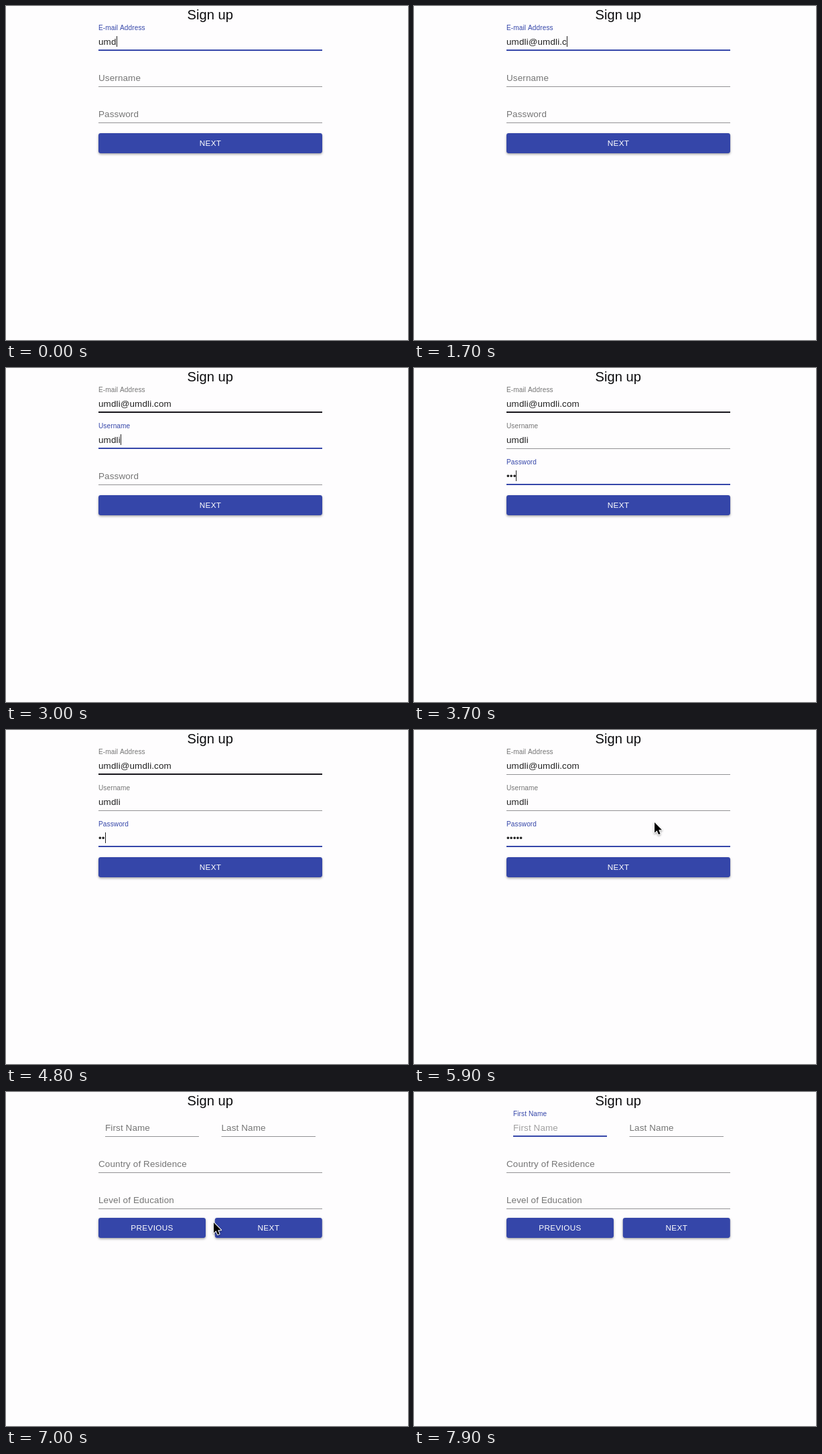
An HTML page with a canvas that plays this animation: 600x499 px, repeating every 8000 ms.

```html
<!DOCTYPE html>
<html lang="en">
<head>
<meta charset="utf-8">
<title>Sign up form</title>
<style>
  html, body { margin: 0; width: 100%; height: 100%; overflow: hidden; background: #fefdfe; }
  canvas { display: block; }
</style>
</head>
<body>
<canvas id="stage" width="600" height="499"></canvas>
<script>
const ctx = document.getElementById('stage').getContext('2d');
const LOOP = 8000, STEP = 100, SIZE = 13.44;
const PRIMARY = [53, 70, 169], DARK = [42, 54, 146], GREY = [117, 117, 117], INK = [33, 33, 33];
const RULE = [146, 146, 148], BLACK = [22, 20, 26];
const PRESS = 6583, SWITCH = 6750, TAB = 7150;

const rgb = c => `rgb(${c.map(Math.round)})`;
const mix = (a, b, p) => rgb(a.map((v, i) => v + (b[i] - v) * p));

// cubic-bezier(0, 0, .2, 1)
function ease(x) {
  if (x <= 0) return 0;
  if (x >= 1) return 1;
  let lo = 0, hi = 1;
  for (let i = 0; i < 24; i++) {
    const s = (lo + hi) / 2;
    if (.6 * (1 - s) * s * s + s ** 3 < x) lo = s; else hi = s;
  }
  return 3 * (1 - lo) * lo * lo + lo ** 3;
}

function text(str, x, y, size, color, align = 'left', spacing = .00938) {
  ctx.font = `${size}px "Liberation Sans", Arial, sans-serif`;
  ctx.letterSpacing = `${size * spacing}px`;
  ctx.textAlign = align;
  ctx.fillStyle = color;
  ctx.fillText(str, x, y);
  return ctx.measureText(str).width;
}

// keys: [time, number of characters typed]
const account = [
  { label: 'E-mail Address', y: 66, value: 'umdli@umdli.com', focus: -1000, blur: 2050, hoverEnd: 5800,
    keys: [[0, 3], [100, 4], [200, 5], [300, 8], [600, 5], [700, 6], [900, 7], [1100, 8], [1200, 9],
           [1300, 10], [1400, 11], [1600, 12], [1700, 13], [1900, 14], [2000, 15]] },
  { label: 'Username', y: 120, value: 'umdli', focus: 2050, blur: 3150,
    keys: [[2500, 1], [2600, 2], [2700, 3], [2800, 4], [3000, 5]] },
  { label: 'Password', y: 174, value: '•••••', focus: 3150, blur: PRESS,
    keys: [[3500, 1], [3700, 3], [4200, 2], [4300, 1], [4400, 0], [4600, 1], [4800, 2], [5000, 3], [5100, 5]] }
];
const profile = [
  { label: 'First Name', x: 148, w: 140, y: 66, focus: TAB },
  { label: 'Last Name', x: 321.5, w: 140.5, y: 66 },
  { label: 'Country of Residence', y: 120 },
  { label: 'Level of Education', y: 174 }
];

function drawField(f, t) {
  const { label, x = 138, w = 334, y, value = '', keys = [], focus = Infinity, blur = Infinity, hoverEnd = 0 } = f;
  const base = y - 8.5;
  const shrink = ease((t - focus) / 200);
  const active = shrink * (1 - ease((t - blur) / 200));
  const [last, count] = keys.filter(k => k[0] <= t).pop() || [focus, 0];

  text(label, x, base - 21.9 * shrink, SIZE * (1 - .25 * shrink), mix(GREY, PRIMARY, active));

  const hovered = t < hoverEnd;
  ctx.fillStyle = hovered ? rgb(BLACK) : mix(BLACK, RULE, hoverEnd ? ease((t - hoverEnd + 60) / 150) : 1);
  ctx.fillRect(x, hovered ? y - 1 : y, w, hovered ? 2 : 1);
  if (active > 0) {
    ctx.fillStyle = rgb(PRIMARY);
    ctx.fillRect(x + w * (1 - active) / 2, y - 1, w * active, 2);
  }

  const typed = value.slice(0, count);
  const width = text(typed, x, base, SIZE, rgb(INK));
  if (t < focus || t >= blur) return;
  if (!typed) text(label, x, base, SIZE, `rgba(0,0,0,${.37 * shrink})`);
  if ((t - last) % 1000 < 500) {
    ctx.fillStyle = rgb(INK);
    ctx.fillRect(Math.round(x + width), y - 21, 1, 16);
  }
}

function drawButton(label, x, y, w, hover = 0, lift = 0) {
  ctx.save();
  ctx.shadowColor = 'rgba(0,0,0,.38)';
  ctx.shadowBlur = 3.5 + 4 * lift;
  ctx.shadowOffsetY = 1.4 + 1.5 * lift;
  ctx.fillStyle = mix(PRIMARY, DARK, hover);
  ctx.beginPath();
  ctx.roundRect(x, y, w, 30, 3.4);
  ctx.fill();
  ctx.restore();
  text(label, x + w / 2, y + 19.2, 11.76, '#fff', 'center', .02857);
}

const arrow = new Path2D('M0 0V15.5L3.6 12.2L6 18L8.6 16.9L6.2 11.3H11Z');
const hand = new Path2D('M1 1.2Q2.6-.6 3.7 1.4L5.3 6Q6.6 4.8 7.6 6Q9 4.9 9.9 6.3Q11.6 5.7 12 7.6L12.6 11.5Q12.8 13.5 11.6 15.6H5.2Q3.6 12.6.2 10.6Q-2 8.6-.2 8Q1.4 7.8 3 9.6Z');
const path = [[5800, 392, 92], [5900, 359, 138], [6000, 338, 165], [6100, 324, 181], [6200, 316, 191], [6400, 310, 195]];

function pointAt(t) {
  const i = path.findIndex(p => p[0] > t);
  if (i < 0) return path[path.length - 1].slice(1);
  const [t0, x0, y0] = path[i - 1], [t1, x1, y1] = path[i], p = (t - t0) / (t1 - t0);
  return [x0 + (x1 - x0) * p, y0 + (y1 - y0) * p];
}

function drawPointer(t) {
  if (t < path[0][0] || t >= TAB) return;
  const [x, y] = pointAt(t), onButton = y > 190 && t < SWITCH;
  if (t >= PRESS && t < SWITCH) {
    ctx.beginPath();
    ctx.arc(308.5, 192, 31.5, 0, Math.PI * 2);
    for (const [color, line] of [['#fff', 5.4], ['#0b0b10', 2.8]]) {
      ctx.strokeStyle = color;
      ctx.lineWidth = line;
      ctx.stroke();
    }
  }
  ctx.save();
  ctx.translate(x, y);
  ctx.lineJoin = 'round';
  ctx.shadowColor = 'rgba(0,0,0,.35)';
  ctx.shadowBlur = 3;
  ctx.shadowOffsetY = 1.5;
  ctx.strokeStyle = onButton ? '#000' : '#fff';
  ctx.fillStyle = onButton ? '#fff' : '#000';
  ctx.lineWidth = onButton ? 1.4 : 2;
  const shape = onButton ? hand : arrow;
  ctx.stroke(shape);
  ctx.shadowColor = 'transparent';
  ctx.fill(shape);
  if (onButton) {
    ctx.lineWidth = .9;
    ctx.stroke(new Path2D('M5.6 9.5V13M7.8 9.5V13M10 9.5V13'));
  }
  ctx.restore();
}

function draw(t) {
  ctx.fillStyle = '#fefdfe';
  ctx.fillRect(0, 0, 600, 499);
  text('Sign up', 304.8, 19.8, 20.16, '#0c0c0e', 'center', 0);
  if (t < SWITCH) {
    account.forEach(f => drawField(f, t));
    const hover = ease((t - 6150) / 250);
    drawButton('NEXT', 138, 190, 334, hover, hover * .5);
  } else {
    profile.forEach(f => drawField(f, t));
    drawButton('PREVIOUS', 138, 188, 160);
    drawButton('NEXT', 311.8, 188, 160);
  }
  drawPointer(t);
}

const start = performance.now();
function tick() {
  const t = (performance.now() - start) % LOOP;
  draw(Math.floor(t / STEP) * STEP);
  requestAnimationFrame(tick);
}
tick();
</script>
</body>
</html>
```
